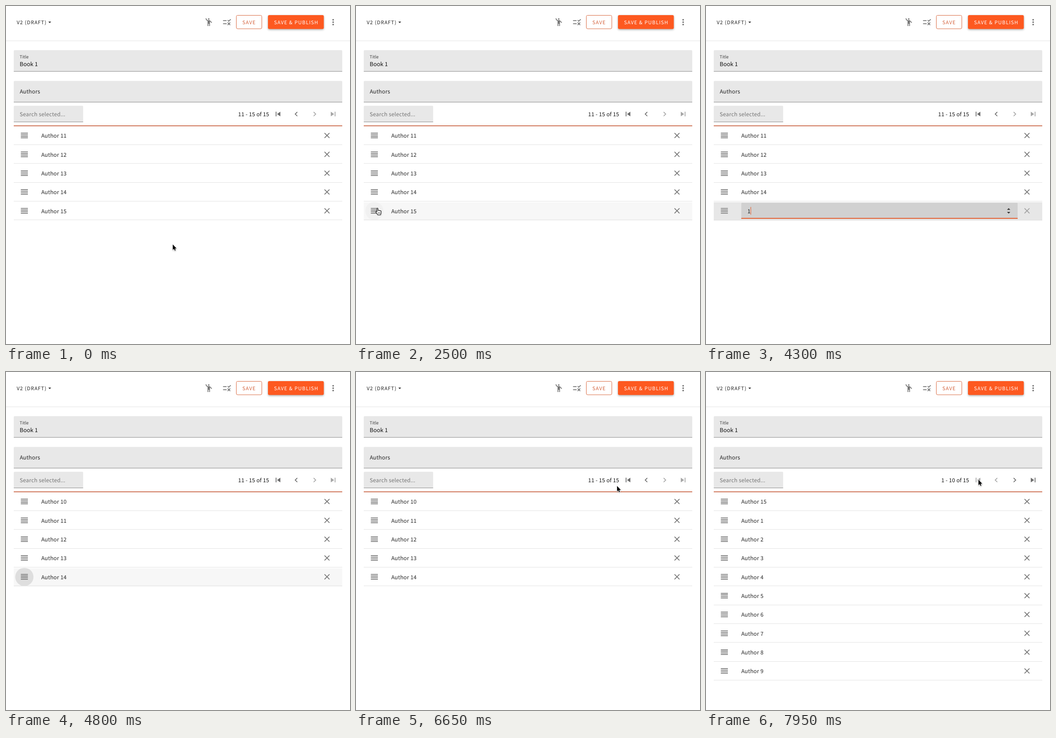
An HTML page with a canvas for the animation above (8 s loop, 755x742 px).

```html
<!DOCTYPE html>
<html lang="en">
<head>
<meta charset="utf-8">
<title>Reordering authors</title>
<style>
  html, body { margin: 0; width: 100%; height: 100%; overflow: hidden; background: #fff; }
  canvas { display: block; }
</style>
</head>
<body>
<canvas id="stage" width="755" height="742"></canvas>
<script>
const ctx = document.getElementById('stage').getContext('2d');
const LOOP = 8000, STEP = 50;
const FONT = '"Noto Sans CJK SC", "Noto Sans CJK JP", "Noto Sans CJK", "Open Sans", sans-serif';
const LEFT = 17, RIGHT = 738, ROW_TOP = 263.4, ROW_H = 41.33, EDIT_ROW = 4;
const ACCENT = '#c8603f', ORANGE = '#fd5920', ICON = '#757575', ICON_OFF = '#a6a6a6', INK = '#232323';

// Moments of the story, in ms
const PRESS = 2650, EDIT = 2700, TYPED = 3750, ENTER = 4800, SETTLED = 5150,
      POINTER_BACK = 6050, PAGE_PRESS = 7400, PAGE_ONE = 7500, ARROW_AGAIN = 7850;

const ICONS = {
  person: 'M14 4a2 2 0 1 1-4 0a2 2 0 1 1 4 0zM15.89 8.11C15.5 7.72 14.83 7 13.53 7H10.99C8.24 6.99 6 4.75 6 2H4c0 3.16 2.11 5.84 5 6.71V22h2v-6h2v6h2V10.05L18.95 14l1.41-1.41z',
  rule: 'M16.54 11L13 7.46l1.41-1.41 2.12 2.12 4.24-4.24 1.41 1.41zM11 7H2v2h9zM21 13.41L19.59 12 17 14.59 14.41 12 13 13.41 15.59 16 13 18.59 14.41 20 17 17.41 19.59 20 21 18.59 18.41 16zM11 15H2v2h9z',
  more: 'M14 6a2 2 0 1 1-4 0a2 2 0 1 1 4 0zM14 12a2 2 0 1 1-4 0a2 2 0 1 1 4 0zM14 18a2 2 0 1 1-4 0a2 2 0 1 1 4 0z',
  first: 'M6 6h2v12H6zM9.5 12l8.5 6V6z',
  prev: 'M15.41 7.41L14 6l-6 6 6 6 1.41-1.41L10.83 12z',
  next: 'M8.59 16.59L13.17 12 8.59 7.41 10 6l6 6-6 6z',
  last: 'M6 18l8.5-6L6 6zM16 6h2v12h-2z',
  handle: 'M3 15h18v-2H3zM3 19h18v-2H3zM3 11h18V9H3zM3 5v2h18V5z',
  close: 'M19 6.41L17.59 5 12 10.59 6.41 5 5 6.41 10.59 12 5 17.59 6.41 19 12 13.41 17.59 19 19 17.59 13.41 12z',
  spinner: 'M12 5l4.2 4.4H7.8zM12 19l4.2-4.4H7.8z'
};
for (const name in ICONS) ICONS[name] = new Path2D(ICONS[name]);

const ARROW = new Path2D('M0 0V12L2.7 9.5 4.5 13.6 6.4 12.8 4.7 8.8H8.3Z');
const HAND = new Path2D('M-1 1.3C-1-.2 1.3-.2 1.3 1.3V5.6C1.6 4.6 3.6 4.7 3.8 5.9 4.3 5 6.1 5.2 6.2 6.4 6.8 5.7 8.2 6.1 8.2 7.3V10.5C8.2 12.5 7 13 7 15H.6C.3 13-2 12-3.8 8.6-4.3 7.2-2.6 6.6-1.7 7.8L-1 8.6Z');
const KNUCKLES = new Path2D('M1.8 9.4V12.4M3.8 9.4V12.4M5.8 9.4V12.4');

// Pointer stops: time, x, y
const STOPS = [
  [0, 366, 523.5], [50, 360, 518], [1500, 360, 518], [2200, 48, 444], [2450, 48, 444], [2500, 47, 443.5],
  [6000, 47, 443.5], [6050, 68.5, 430], [6150, 68.5, 430], [6700, 585, 246], [6800, 585, 246],
  [7200, 605, 236.5], [7800, 605, 236.5], [7950, 598, 236.5], [LOOP, 598, 236.5]
];

const clamp = v => Math.max(0, Math.min(1, v));
const ramp = (t, from, to) => clamp((t - from) / (to - from));
const smooth = k => k * k * (3 - 2 * k);
const black = alpha => `rgba(0,0,0,${alpha})`;

function pointerAt(t) {
  const i = STOPS.findIndex(s => s[0] > t);
  const [t0, x0, y0] = STOPS[i - 1], [t1, x1, y1] = STOPS[i];
  const k = smooth(ramp(t, t0, t1));
  return { x: x0 + (x1 - x0) * k, y: y0 + (y1 - y0) * k };
}

function rect(x, y, w, h, color) {
  ctx.fillStyle = color;
  ctx.fillRect(x, y, w, h);
}

function circle(x, y, r, color) {
  ctx.fillStyle = color;
  ctx.beginPath();
  ctx.arc(x, y, r, 0, Math.PI * 2);
  ctx.fill();
}

function text(str, x, y, color = INK, size = 11.82, spacing = 0.23) {
  ctx.font = `${size}px ${FONT}`;
  ctx.letterSpacing = spacing + 'px';
  ctx.fillStyle = color;
  ctx.fillText(str, x, y);
}

const caps = (str, x, color) => text(str, x, 39.9, color, 10.8, 1.07);

function icon(name, cx, cy, color = ICON) {
  ctx.save();
  ctx.translate(cx, cy);
  ctx.scale(0.861, 0.861);
  ctx.translate(-12, -12);
  ctx.fillStyle = color;
  ctx.fill(ICONS[name]);
  ctx.restore();
}

function field(x, y, w, h, fill = '#e8e8e8') {
  ctx.fillStyle = fill;
  ctx.beginPath();
  ctx.roundRect(x, y, w, h, [2, 2, 0, 0]);
  ctx.fill();
  rect(x, y + h - 1, w, 1, '#8c8c8c');
}

function drawHeader() {
  caps('V2 (DRAFT)', 23.5, INK);
  ctx.fillStyle = INK;
  ctx.beginPath();
  ctx.moveTo(93, 34.3);
  ctx.lineTo(99, 34.3);
  ctx.lineTo(96, 37.6);
  ctx.fill();

  icon('person', 445, 35.5);
  icon('rule', 485, 35.5);
  icon('more', 718, 35.5, '#6c6c6c');

  ctx.strokeStyle = '#d9683f';
  ctx.lineWidth = 1;
  ctx.beginPath();
  ctx.roundRect(505.5, 20.5, 56, 29.5, 3);
  ctx.stroke();
  caps('SAVE', 518.8, '#d4623c');

  ctx.save();
  ctx.shadowColor = black(0.32);
  ctx.shadowBlur = 4;
  ctx.shadowOffsetY = 1.6;
  ctx.fillStyle = ORANGE;
  ctx.beginPath();
  ctx.roundRect(575, 20, 122.5, 30.6, 3);
  ctx.fill();
  ctx.restore();
  caps('SAVE & PUBLISH', 588.2, '#fff');

  rect(0, 76, 755, 1, '#e4e4e4');
}

function drawFields() {
  field(LEFT, 97, RIGHT - LEFT, 47);
  text('Title', 30, 114.6, '#3c3c3c', 9.25, 0.1);
  text('Book 1', 30, 131.5, '#111', 12.3, 0.1);
  field(LEFT, 164.5, RIGHT - LEFT, 47);
  text('Authors', 30.2, 192.3);
  field(LEFT, 219, 152.3, 36);
  text('Search selected...', 30, 242, '#737373');
}

function drawPager(t, pointer) {
  const firstPage = t >= PAGE_ONE;
  text(firstPage ? '1 - 10 of 15' : '11 - 15 of 15', firstPage ? 516.4 : 509.6, 241.9, '#111');

  const over = Math.hypot(pointer.x - 597, pointer.y - 237) < 21 && t > 6500;
  if (over && !firstPage) circle(597, 237.3, 20, black(0.025));
  if (t >= PAGE_PRESS && t < 7700) {
    const grow = smooth(ramp(t, PAGE_PRESS - 50, PAGE_PRESS + 100));
    circle(597, 237.3, 8 + 12 * grow, black(0.13 * (1 - ramp(t, 7550, 7700))));
  }
  const back = firstPage ? ICON_OFF : '#6c6c6c', forward = firstPage ? '#6c6c6c' : ICON_OFF;
  icon('first', 597, 237.2, back);
  icon('prev', 637, 237.2, back);
  icon('next', 677.5, 237.2, forward);
  icon('last', 718, 237.2, forward);
}

function authorsAt(t) {
  if (t >= PAGE_ONE) return [15, 1, 2, 3, 4, 5, 6, 7, 8, 9];
  const start = t >= ENTER ? 10 : 11;
  return Array.from({ length: 5 }, (_, i) => start + i);
}

function drawEditor(t, mid) {
  const x = 77.5, w = 606.5, top = mid - 17.6;
  field(x, top, w, 35, '#d1d1d1');
  const line = smooth(ramp(t, 2750, 2950)) * w;
  rect(x + (w - line) / 2, top + 33.3, line, 1.8, '#e4531f');
  icon('spinner', 664.3, mid + 0.2, '#333');

  const typed = t >= TYPED;
  if (typed) text('1', 91, mid + 5, '#151515');
  else text('Type a new order number and press Enter, or press Esc to cancel.', 91.3, mid + 5, '#717171');
  if (typed) rect(97.8, mid - 8.5, 1, 17, '#e4531f');
  else if (t < 3300) rect(91, mid - 8.5, 1, 17, t < 2800 ? '#777' : '#d65a32');
}

function drawTable(t, pointer) {
  const authors = authorsAt(t);
  const hovered = Math.floor((pointer.y - ROW_TOP) / ROW_H);
  const editing = t >= EDIT && t < ENTER;

  authors.forEach((author, i) => {
    const top = ROW_TOP + i * ROW_H, mid = top + 20.9;
    const edited = editing && i === EDIT_ROW;
    if (edited) {
      const shade = Math.round(235 - 4 * ramp(t, 2750, 2900));
      rect(LEFT, top + 2, RIGHT - LEFT, ROW_H - 1, `rgb(${shade},${shade},${shade})`);
    } else if (i === hovered) {
      rect(LEFT, top + 2, RIGHT - LEFT, ROW_H - 1, '#f7f7f7');
      if (pointer.x < 72) circle(40.3, mid + 0.3, 20, black(t >= ENTER && t < SETTLED ? 0.1 : 0.025));
    }
    if (i === EDIT_ROW && t >= PRESS && t < 3100) {
      const grow = smooth(ramp(t, PRESS - 50, 2750));
      circle(40.3, mid + 0.3, 8 + 12 * grow, black(0.14 * (1 - ramp(t, 2800, 3100))));
    }
    icon('handle', 40.3, mid, edited ? '#828282' : ICON);
    icon('close', 704.5, mid, edited ? '#a0a0a0' : ICON);
    if (edited) drawEditor(t, mid);
    else text('Author ' + author, 77.5, mid + 5.1);
    rect(LEFT, Math.round(top + ROW_H - 0.7), RIGHT - LEFT, 1, '#e3e3e3');
  });
  rect(LEFT, 262.2, RIGHT - LEFT, 1.7, ACCENT);
}

function drawPointer(t, { x, y }) {
  if (t >= TYPED && t < POINTER_BACK) return;
  const overHandle = x < 72 && y > ROW_TOP && y < ROW_TOP + 5 * ROW_H;
  const overPager = x > 576 && x < 618 && y < 258;
  const hand = overHandle || (overPager && t < ARROW_AGAIN);

  ctx.save();
  ctx.translate(x, y);
  ctx.lineJoin = 'round';
  ctx.shadowColor = black(0.3);
  ctx.shadowBlur = 2;
  ctx.shadowOffsetY = 1;
  if (hand) {
    ctx.fillStyle = '#fff';
    ctx.fill(HAND);
    ctx.shadowColor = 'transparent';
    ctx.strokeStyle = '#111';
    ctx.lineWidth = 1.1;
    ctx.stroke(HAND);
    ctx.lineWidth = 0.8;
    ctx.stroke(KNUCKLES);
  } else {
    ctx.strokeStyle = '#fff';
    ctx.lineWidth = 1.8;
    ctx.stroke(ARROW);
    ctx.shadowColor = 'transparent';
    ctx.fillStyle = '#000';
    ctx.fill(ARROW);
  }
  ctx.restore();
}

function draw(t) {
  const pointer = pointerAt(t);
  rect(0, 0, 755, 742, '#fff');
  drawHeader();
  drawFields();
  drawPager(t, pointer);
  drawTable(t, pointer);
  drawPointer(t, pointer);
}

ctx.textRendering = 'geometricPrecision';
const began = performance.now();
function tick() {
  const t = (performance.now() - began) % LOOP;
  draw(Math.floor(t / STEP) * STEP);
  requestAnimationFrame(tick);
}
tick();
</script>
</body>
</html>
```
